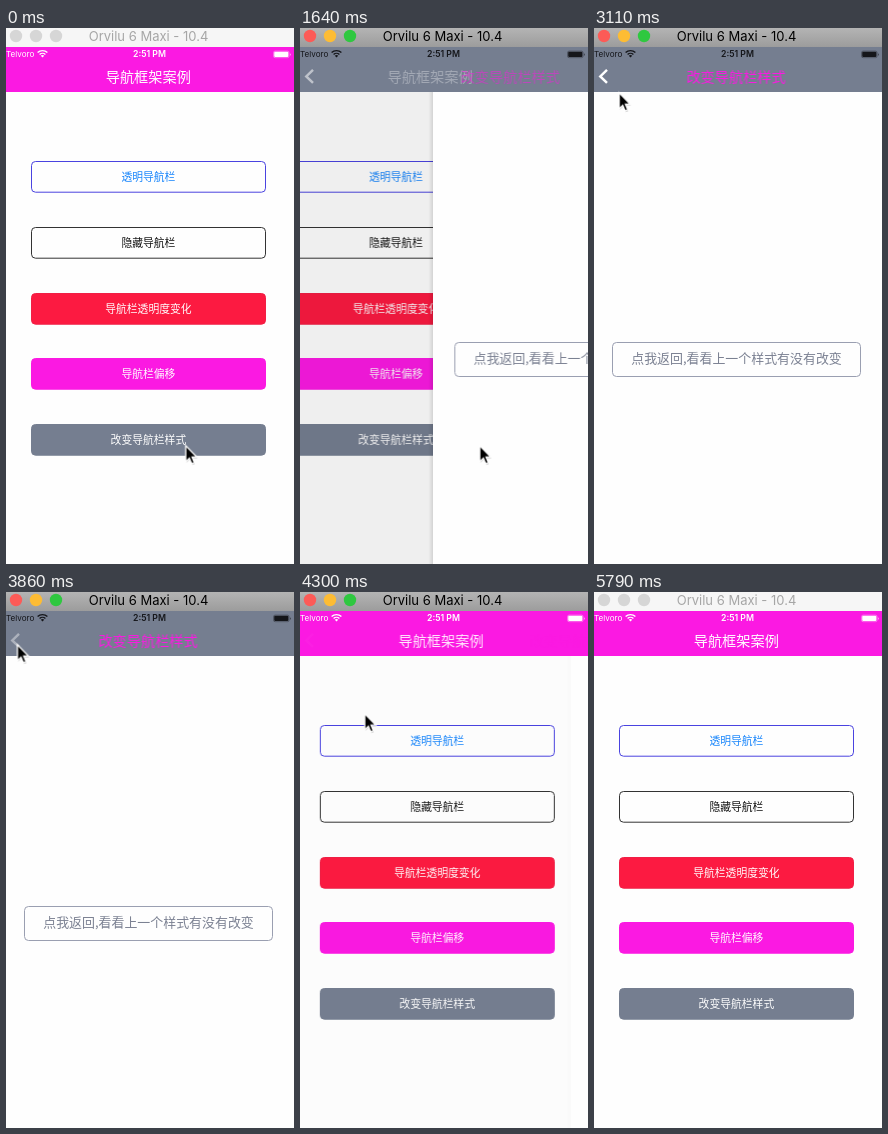
An HTML page for the animation above (5.94 s loop, 288x536 px).

```html
<!DOCTYPE html>
<html lang="zh-CN">
<head>
<meta charset="utf-8">
<title>导航框架案例</title>
<style>
  html, body { margin: 0; width: 100%; height: 100%; overflow: hidden; background: #fefefe; }
  svg { display: block; width: 288px; height: 536px; }
  text { font-family: "Noto Sans CJK SC", "Noto Sans CJK", sans-serif; text-anchor: middle; }
  .latin { font-family: Inter, Roboto, sans-serif; }
  .title { font-size: 14.2px; }
  .label { font-size: 10.8px; }
</style>
</head>
<body>
<svg viewBox="0 0 288 536">
  <defs>
    <linearGradient id="chrome" x2="0" y2="1">
      <stop stop-color="#b4b4b4"/><stop offset="1" stop-color="#9c9c9c"/>
    </linearGradient>
    <linearGradient id="edge">
      <stop stop-opacity="0"/><stop offset="1" stop-opacity=".24"/>
    </linearGradient>
    <g id="lights"><circle cx="10" cy="8" r="6.2"/><circle cx="30" cy="8" r="6.2"/><circle cx="50" cy="8" r="6.2"/></g>
    <path id="arrow" d="M0 0 V15.9 L3.6 12.5 L5.9 18.1 L8.6 17 L6.3 11.5 H11.2 Z"/>
  </defs>

  <g id="list"></g>
  <rect id="dim" y="64" width="288" height="472"/>

  <g id="detail">
    <rect id="shadow" x="-8" y="64" width="5" height="472" fill="url(#edge)"/>
    <rect x="-3" y="64" width="294" height="472" fill="#fefefe"/>
    <rect x="18.5" y="314.5" width="248" height="34" rx="4" fill="none" stroke="#9a9fb1"/>
    <text x="142.5" y="335.3" font-size="12.95" fill="#7b8192">点我返回,看看上一个样式有没有改变</text>
  </g>

  <rect id="bar" y="19" width="288" height="45"/>
  <g id="status" fill="currentColor">
    <text class="latin" x="0" y="29.4" font-size="8.1" style="text-anchor:start">Telvoro</text>
    <path d="M36.5 29.6 L34.8 27.8 A2.4 2.4 0 0 1 38.2 27.8 Z"/>
    <path d="M33.6 26.5 A4.2 4.2 0 0 1 39.4 26.5 M31.6 24.6 A7 7 0 0 1 41.4 24.6"
          fill="none" stroke="currentColor" stroke-width="1.4"/>
    <text class="latin" x="143.5" y="29.4" font-size="8.7" font-weight="600">2:51 PM</text>
    <rect x="267.5" y="23.1" width="15.6" height="6.6" rx="1.6" fill="none" stroke="currentColor" stroke-width=".7" opacity=".5"/>
    <rect x="268.2" y="23.8" width="14.2" height="5.2" rx="1"/>
    <rect x="284" y="25.4" width="1" height="2.2" rx=".5" opacity=".5"/>
  </g>
  <text id="listTitle" class="title" x="142.3" y="53.8" fill="#fff">导航框架案例</text>
  <text id="detailTitle" class="title" x="142.1" y="53.8" fill="#fb19e2">改变导航栏样式</text>
  <path id="chevron" d="M13 41.9 L6.3 48.4 L13 54.9" fill="none" stroke="#fff" stroke-width="2.5"/>

  <rect width="288" height="19" fill="#f6f6f6"/>
  <use href="#lights" fill="#d6d6d6"/>
  <g id="active">
    <rect width="288" height="19" fill="url(#chrome)"/>
    <circle cx="10" cy="8" r="6.2" fill="#fc5b57"/>
    <circle cx="30" cy="8" r="6.2" fill="#fdbc34"/>
    <circle cx="50" cy="8" r="6.2" fill="#2fc840"/>
  </g>
  <text id="device" class="latin" x="142.5" y="13" font-size="13">Orvilu 6 Maxi - 10.4</text>

  <g id="cursor">
    <use href="#arrow" x=".6" y="1.2" opacity=".25"/>
    <use href="#arrow" stroke="#fff" stroke-width="1.3"/>
  </g>
</svg>
<script>
const LOOP = 5940, WIDTH = 291;
const TICK = 147.65, PHASE = 9;
const FOCUS = 1490, BLUR = 5790;
const PUSH = 1579, MOVE = 2380, PRESS = 3850, POP = 4089;
const PINK = '#fb19e2', GREY = '#757e90';
const REST = { x: 179.7, y: 417.6 }, BACK = { x: 11.4, y: 52.4 }, EXIT = { x: 288, y: 411.4 };

const $ = id => document.getElementById(id);
const mix = (a, b, k) => a + (b - a) * k;

// [label, text colour, fill, border]
const buttons = [
  ['透明导航栏', '#1684fb', 'none', '#4a43e0'],
  ['隐藏导航栏', '#111', 'none', '#333'],
  ['导航栏透明度变化', '#fff', '#fc1a41', '#f01f45'],
  ['导航栏偏移', '#fff', PINK, PINK],
  ['改变导航栏样式', '#fff', GREY, GREY]
];
$('list').innerHTML = '<rect x="-3" y="64" width="294" height="472" fill="#fefefe"/>' +
  buttons.map(([label, ink, fill, line], i) => {
    const y = Math.round(133.2 + i * 65.75) + .5;
    return `<rect x="25.5" y="${y}" width="234" height="30.7" rx="4" fill="${fill}" stroke="${line}"/>
      <text class="label" x="142.4" y="${y + 19.4}" fill="${ink}">${label}</text>`;
  }).join('');

const ticks = [0];
for (let t = PHASE + TICK; t < LOOP; t += TICK) ticks.push(t);

// Samples a style function of time and holds each sample until the next.
function play(id, style, times = ticks) {
  const frames = times.map(t => ({ offset: t / LOOP, easing: 'step-end', ...style(t) }));
  frames.push({ ...frames[frames.length - 1], offset: 1 });
  $(id).animate(frames, { duration: LOOP, iterations: Infinity });
}

const move = (x, y = 0) => ({ transform: `translate(${x.toFixed(2)}px, ${y.toFixed(2)}px)` });
const inDetail = t => t >= PUSH && t < POP;

// How far the detail page covers the list, settling exponentially.
function cover(t) {
  if (t < PUSH) return 0;
  const rest = Math.exp(-.014 * (t - (t < POP ? PUSH : POP)));
  return t < POP ? 1 - rest : rest;
}

// Up and left to the back arrow, then off to the lower right.
function cursor(t) {
  if (t >= POP) {
    const k = Math.max(0, (t - POP - 54) / (3 * TICK)) ** 1.5;
    return move(mix(BACK.x, EXIT.x, k), mix(BACK.y, EXIT.y, k));
  }
  const n = (t - MOVE) / TICK;
  if (n < .9) return move(REST.x, REST.y);
  const left = 1 / (1 + Math.exp(1.35 * (n - 3.15)));
  const down = .96 * Math.exp(-.85 * (n - 1));
  return move(mix(BACK.x, REST.x, left), mix(BACK.y, REST.y, down));
}

play('list', t => move(-.3 * WIDTH * cover(t)));
play('dim', t => ({ opacity: .11 * cover(t) }));
play('detail', t => move(WIDTH * (1 - cover(t))));
play('shadow', t => ({ opacity: cover(t) }));
play('bar', t => ({ fill: inDetail(t) ? GREY : PINK }));
play('status', t => ({ color: inDetail(t) ? '#15161a' : '#fff' }));
play('listTitle', t => ({ ...move(-23 * cover(t)), opacity: (1 - cover(t)) ** 1.4 }));
play('detailTitle', t => ({ ...move(WIDTH / 2 * (1 - cover(t))), opacity: cover(t) }));
play('chevron', t => ({ opacity: cover(t) * (t < PRESS - PHASE ? 1 : .4) }));
play('cursor', cursor);

const focus = [0, FOCUS, BLUR];
const focused = t => t >= FOCUS && t < BLUR;
play('active', t => ({ opacity: focused(t) ? 1 : 0 }), focus);
play('device', t => ({ fill: focused(t) ? '#000' : '#a6a6a6' }), focus);
</script>
</body>
</html>
```
